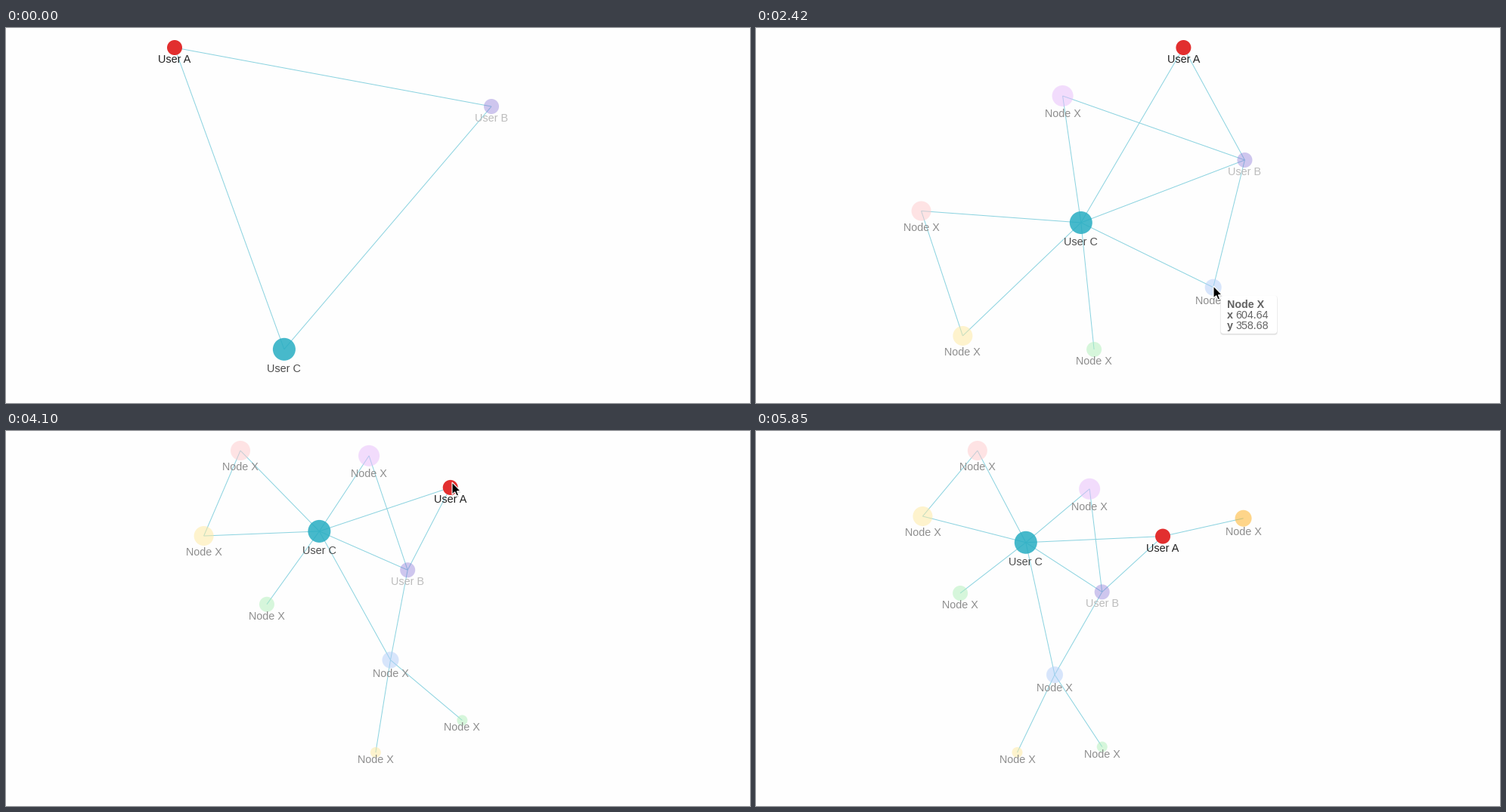
Recreate the animation shown at these times as a matplotlib script. Size 984 px wide and 497 px high, loop 6150 ms.

```python
import numpy as np
import matplotlib.pyplot as plt
from matplotlib.animation import FuncAnimation
from matplotlib.collections import LineCollection
from matplotlib.patches import Circle, FancyBboxPatch, Polygon

W, H = 984, 497
STEP, LOOP = 50, 6150
PX = 0.72  # points per pixel at 100 dpi
BG = "#fefefe"
HUB = 2

USERS = [("User A", "#202020"), ("User B", "#bcbcbc"), ("User C", "#4c4c4c")]
OTHER = ("Node X", "#8e8e8e")
# radius, fill, alpha
DOTS = [(10, "#e22f2f", 1), (10, "#8872d6", 0.4), (15, "#27adc2", 0.85),
        (11, "#b2cefa", 0.5), (13, "#ffcacc", 0.5), (14, "#e8bcfc", 0.5),
        (10, "#b0f0ba", 0.5), (13, "#ffe99e", 0.5), (7, "#ffe99e", 0.5),
        (7, "#b0f0ba", 0.5), (11, "#ffae18", 0.5)]
# neighbours of each node among the later ones
LINKS = [(a, b) for a, ends in {0: (1, 2, 10), 1: (2, 3, 5),
                                2: (3, 4, 5, 6, 7), 3: (8, 9), 4: (7,)}.items()
         for b in ends]


def pose(*xy):
    return np.array([complex(x, y) for x, y in xy])


def polar(deg, r):
    return r * np.exp(1j * np.radians(deg))


def fit(p):
    """Scale to 400 px high and centre the layout."""
    x, y = p.real, p.imag
    mid = complex(x.min() + x.max(), y.min() + y.max()) / 2
    return (p - mid) * 400 / np.ptp(y) + complex(432.5, 226)


def spin(p, deg, k, own):
    """Turn and scale a layout about its hub; some nodes go their own way."""
    factor = [polar(*own.get(j, (deg, k))) for j in range(len(p))]
    return (p - p[HUB]) * factor


def sprout(p, parent, length, *bends):
    """Add leaves to a parent, bent from its direction off the hub."""
    arm = p[parent] - p[HUB]
    out = arm / abs(arm) * length
    return np.append(p, [p[parent] + out * polar(b, 1) for b in bends])


def swing(a, b, u):
    """Move every node round the hub from layout a to layout b."""
    ra, rb = a - a[HUB], b - b[HUB]
    ra[HUB] = rb[HUB] = 1
    rel = ra * (rb / ra) ** u
    rel[HUB] = 0
    return fit(rel)


TRIO = pose((223, 26), (642, 104), (367.9, 425.8))
BURST = pose((367, 26), (598.7, 86.5), (552.5, 334), (457, 165),
             (266, 231), (416.5, 273), (354.5, 309), (408, 426))
STAR = pose((565.3, 26), (646.3, 175), (429.7, 258), (604.6, 343.7),
            (218.5, 242.5), (405.5, 90), (447, 426), (273.3, 408))
PAIR = (3, 124, 38, -21)
LEAF = (0, 110, -10)
CALM = fit(sprout(spin(STAR, 41.5, 0.705, {0: (41.2, 0.68), 1: (44.7, 0.55),
                                           3: (35, 1)}), *PAIR))
REST = fit(sprout(spin(CALM, 16.6, 0.928, {0: (15.9, 1), 1: (9.3, 0.95)}),
                  *LEAF))

# start, end, layouts, share of the way at start and end, decay
MOVES = [
    (1150, 2000, BURST, STAR, 0, 1, 5),
    (2810, 3390, sprout(STAR, *PAIR), CALM, 0.35, 1, 2),
    (4190, 4710, sprout(CALM, *LEAF), REST, 0.4, 0.9, 4),
    (4800, 5060, sprout(CALM, *LEAF), REST, 0.9, 1, 2),
]

# pointer: start, end, x and y reached
ENTRY = (372, 500)
LEGS = [(480, 850, 367, 431), (1300, 1740, 520, 386), (1830, 2250, 605, 342),
        (2950, 3380, 611, 313), (3460, 4000, 590, 68), (4420, 4710, 661, 233),
        (4800, 5060, 671, 298), (5390, 5850, 938, 500)]

# title, shown x and y, visible spans
TIPS = [("User C", 367.89, 440.77, [(900, 1500)]),
        ("Node X", 604.64, 358.68, [(2300, 3300)]),
        ("User A", 588.70, 89.88, [(3980, 4100), (4190, 4900)])]


def layout(t):
    now = TRIO
    for start, end, a, b, u0, u1, k in MOVES:
        if t >= start:
            v = min((t - start) / (end - start), 1)
            ease = (1 - np.exp(-k * v)) / (1 - np.exp(-k))
            now = swing(a, b, u0 + (u1 - u0) * ease)
    return now


def pointer(t):
    at = np.array(ENTRY, float)
    for start, end, x, y in LEGS:
        v = np.clip((t - start) / (end - start), 0, 1)
        at += (np.array([x, y]) - at) * v * v * (3 - 2 * v)
    return at


fig = plt.figure(figsize=((W + 0.01) / 100, (H + 0.01) / 100), dpi=100,
                 facecolor=BG)
ax = fig.add_axes([0, 0, 1, 1])
ax.set_xlim(0, W)
ax.set_ylim(H, 0)
ax.axis("off")


def write(x, y, s, px, color, z, **kw):
    return ax.text(x, y, s, fontsize=px * PX, color=color, zorder=z,
                   family="Liberation Sans", va="baseline", **kw)


def make_tip(title, vx, vy):
    w, h, ink = 74.5, 50.5, "#636363"
    x, y = vx + 10, vy - 4
    if y + h > H - 20:  # no room below the node
        y -= h + 21
    parts = []
    for grow, dy, color, alpha in ((1, 1, "black", 0.04),
                                   (0.2, 1, "black", 0.1), (0, 0, "white", 1)):
        box = FancyBboxPatch((x - grow, y - grow + dy), w + 2 * grow,
                             h + 2 * grow, fc=color, ec="none", alpha=alpha,
                             boxstyle="round,pad=0,rounding_size=4", zorder=4)
        parts.append(ax.add_patch(box))
    parts.append(write(x + 8, y + 16, title, 14.2, ink, 5, weight="bold"))
    for key, val, dy in (("x", vx, 30), ("y", vy, 44)):
        parts.append(write(x + 8, y + dy, key, 14.2, ink, 5, weight="bold"))
        parts.append(write(x + 19.5, y + dy, f"{val:.2f}", 14.2, ink, 5))
    return parts


lines = ax.add_collection(LineCollection([], colors="#8bd3e0",
                                         linewidths=PX, zorder=1))
dots, labels = [], []
for j, (r, fill, alpha) in enumerate(DOTS):
    name, ink = USERS[j] if j < len(USERS) else OTHER
    dots.append(ax.add_patch(Circle((0, 0), r, fc=fill, ec="none",
                                    alpha=alpha, zorder=2)))
    labels.append(write(0, 0, name, 14.4, ink, 3, ha="center"))
tips = [(make_tip(*tip), spans) for *tip, spans in TIPS]

ARROW = np.array([(0, 0), (0, 16), (3.7, 12.7), (6.1, 18), (8.6, 17),
                  (6.4, 11.8), (11.2, 11.6)])
shade = ax.add_patch(Polygon(ARROW, fc="black", ec="none", alpha=0.15,
                             zorder=6))
arrow = ax.add_patch(Polygon(ARROW, fc="black", ec="white",
                             lw=1.1 * PX, zorder=7))


def draw(i):
    t = i * STEP
    p = layout(t)
    n = len(p)
    spots = np.column_stack([p.real, p.imag])
    lines.set_segments([spots[[a, b]] for a, b in LINKS if b < n])
    for j, (dot, label) in enumerate(zip(dots, labels)):
        dot.set_visible(j < n)
        label.set_visible(j < n)
        if j < n:
            x, y = spots[j]
            dot.center = x, y
            label.set_position((x, y + 2 * DOTS[j][0]))
    for parts, spans in tips:
        for part in parts:
            part.set_visible(any(a <= t < b for a, b in spans))
    at = pointer(t)
    arrow.set_xy(ARROW + at)
    shade.set_xy(ARROW + at + (0.5, 2))
    for part in (arrow, shade):
        part.set_visible(LEGS[0][0] < t < LEGS[-1][1])
    return []


anim = FuncAnimation(fig, draw, frames=LOOP // STEP, interval=STEP,
                     repeat=True, repeat_delay=0, init_func=lambda: draw(0))
plt.show()
```
